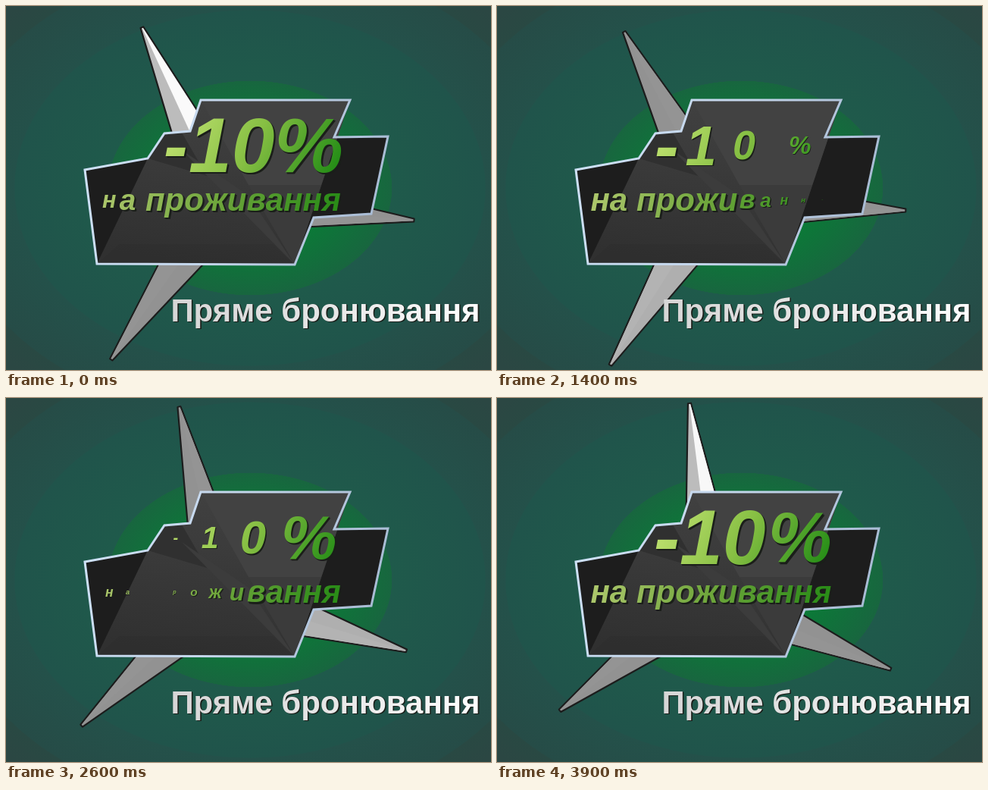
Animation, 640 px wide and 480 px high, one loop 4 s. Source, as an HTML page with a canvas:

```html
<!DOCTYPE html>
<html lang="uk">
<head>
<meta charset="utf-8">
<title>-10%</title>
<style>
html, body { margin: 0; width: 100%; height: 100%; overflow: hidden; background: #20554b; }
canvas { display: block; }
</style>
</head>
<body>
<canvas id="stage" width="640" height="480"></canvas>
<script>
const ctx = document.getElementById('stage').getContext('2d');
const STEP = 100, STEPS = 40, TURN = 41, PULSE = TURN / 2;
const FAMILY = '"Liberation Sans", Arial, sans-serif';
const rad = deg => deg * Math.PI / 180;
const grey = v => `rgb(${v},${v},${v})`;

function linear(x0, y0, x1, y1, ...colors) {
  const g = ctx.createLinearGradient(x0, y0, x1, y1);
  colors.forEach((c, i) => g.addColorStop(i / (colors.length - 1), c));
  return g;
}

function poly(points, fill, stroke, width) {
  ctx.beginPath();
  points.forEach(([x, y]) => ctx.lineTo(x, y));
  ctx.closePath();
  if (fill) { ctx.fillStyle = fill; ctx.fill(); }
  if (stroke) { ctx.strokeStyle = stroke; ctx.lineWidth = width; ctx.stroke(); }
}

// Elliptical glow with two soft bands and visible rims
const glow = ctx.createRadialGradient(0, 0, 0, 0, 0, 440);
[[0, '#00862e'], [.25, '#0c7838'], [.425, '#18663f'], [.426, '#1f5a4b'],
 [.705, '#20544b'], [.707, '#24514a'], [.91, '#264c47'], [.912, '#294943'], [1, '#2b4743']]
  .forEach(([at, c]) => glow.addColorStop(at, c));

function drawBackground() {
  ctx.save();
  ctx.translate(322, 240);
  ctx.scale(1, .755);
  ctx.fillStyle = glow;
  ctx.fillRect(-330, -330, 660, 660);
  ctx.restore();
}

const HUB = [285.5, 259], REACH = 254;

function drawSpike(deg, bright) {
  const facing = ((1 + Math.cos(rad(deg + 110))) / 2) ** 2;
  const near = bright ? 176 + 74 * facing : 148;
  const far = bright ? 174 + 14 * facing : 146;
  ctx.save();
  ctx.translate(...HUB);
  ctx.rotate(rad(deg));
  ctx.lineJoin = 'round';
  poly([[REACH, -2], [REACH, 2], [0, 38], [0, -38]], grey(far), '#1c1c1c', 2.2);
  poly([[REACH - 1, 0], [REACH - 1, 1], [0, 37], [0, 0]], grey(near));
  ctx.restore();
}

const PANEL = [[104, 216], [187, 201], [209, 168], [243, 165], [257, 124], [454, 124],
  [433, 173], [504, 172], [482, 274], [406, 279], [381, 341], [120, 340]];
const rim = linear(104, 150, 504, 270, '#cfe2f8', '#c3d5ea', '#a6b9d2');
const face = linear(300, 124, 270, 341, '#414141', '#393939', '#303030');

function drawPanel() {
  poly(PANEL, '#1d1d1d');
  poly([[187, 201], [209, 168], [243, 165], [257, 124], [454, 124], [381, 341], [120, 340]], face);
  poly([[257, 124], [454, 124], [416, 236], [320, 236]], '#424242');
  poly([[320, 236], [416, 236], [381, 341]], '#3b3b3b');
  poly([[187, 201], [209, 168], [232, 167], [265, 224]], '#303030');
  poly([[232, 190], [320, 250], [381, 341]], '#3c3c3c');
  poly([[120, 340], [381, 341], [352, 314], [150, 314]], 'rgba(40,40,40,.2)');
  ctx.lineJoin = 'miter';
  poly(PANEL, null, rim, 3);
}

// Splits a line into letters, each with its own centre
function layout(text, size, middle) {
  ctx.font = `italic bold ${size}px ${FAMILY}`;
  const width = s => ctx.measureText(s).width;
  let x = middle - width(text) / 2;
  return [...text].map(ch => {
    const w = width(ch), letter = { ch, x: x + w / 2 };
    x += w;
    return letter;
  }).filter(l => l.ch !== ' ');
}

const LINES = [
  { text: '-10%', size: 102, middle: 326, base: 219, pivot: 184, first: 7, lag: 1.52,
    span: 7.5, depth: 3, fill: linear(222, 130, 425, 245, '#c4e474', '#86bf43', '#1f8a14') },
  { text: 'на проживання', size: 42, middle: 282, base: 270, pivot: 256, first: 3.5, lag: .94,
    span: 4.8, depth: 3, fill: linear(135, 215, 425, 290, '#adc76c', '#6fa63c', '#2b8c18') }
];
LINES.forEach(l => l.letters = layout(l.text, l.size, l.middle));

// Shrinks to nothing at its own moment, then grows back
function scaleAt(step, zero, span) {
  const d = Math.abs(step - zero) % PULSE;
  return Math.min(1, Math.min(d, PULSE - d) / span);
}

function solidText(ch, x, y, depth, fill) {
  ctx.fillStyle = '#1b1f1a';
  for (let d = depth; d > 0; d--) ctx.fillText(ch, x + d * .8, y + d * .8);
  ctx.fillStyle = fill;
  ctx.fillText(ch, x, y);
}

function drawLine(line, step) {
  line.letters.forEach(({ ch, x }, i) => {
    const s = scaleAt(step, line.first + i * line.lag, line.span);
    if (s < .03) return;
    ctx.font = `italic bold ${line.size * s}px ${FAMILY}`;
    solidText(ch, x, line.pivot + (line.base - line.pivot) * s, line.depth * s, line.fill);
  });
}

const silver = linear(219, 0, 625, 0, '#d6d6d6', '#e6e6e6', '#ffffff');

function drawCaption() {
  ctx.font = `bold 42px ${FAMILY}`;
  solidText('Пряме бронювання', 421.5, 415.5, 2, silver);
}

function draw(step) {
  drawBackground();
  const angle = 5.3 - step * 360 / TURN;
  [0, 120, 240].forEach(a => drawSpike(angle + a, a === 240));
  drawPanel();
  ctx.textAlign = 'center';
  LINES.forEach(line => drawLine(line, step));
  drawCaption();
}

const start = performance.now();
function tick() {
  draw(Math.floor((performance.now() - start) / STEP) % STEPS);
  requestAnimationFrame(tick);
}
tick();
</script>
</body>
</html>
```
